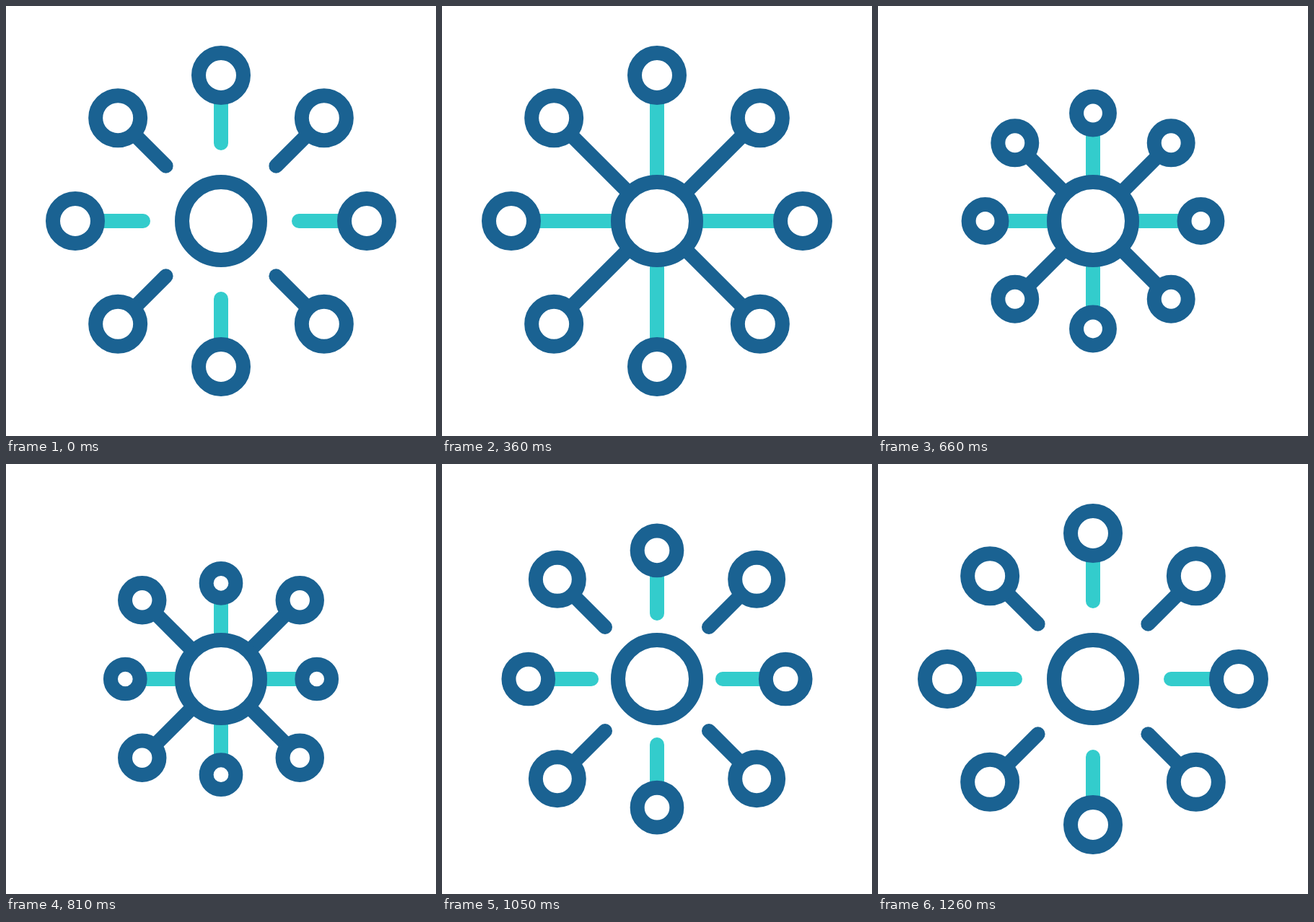
Animation of 596 by 596 pixels, one loop 1500 ms. Source, as an HTML page with a canvas:

```html
<!DOCTYPE html>
<html lang="en">
<head>
<meta charset="utf-8">
<title>Hub and nodes</title>
<style>
  html, body { margin: 0; width: 100%; height: 100%; overflow: hidden; background: #fff; }
  canvas { display: block; width: 596px; height: 596px; }
</style>
</head>
<body>
<canvas id="stage" width="596" height="596"></canvas>
<script>
const ctx = document.getElementById('stage').getContext('2d');
const BLUE = '#1a6292', TEAL = '#33cccc';
const LOOP = 1500, STEP = 30;
const CENTER = 298, HUB = 54, ORBIT = 202, NODE = 31, STROKE = 20;

// Keys are [step, value, slope]. "shrink" is the part of the scale taken away;
// "tip" is the inner end of a spoke before scaling.
const straight = {
  color: TEAL, turn: 0,
  shrink: [[12, 0, 0], [18, .0773, .028], [19, .1073, .032], [25, .365, 0],
           [27, .343, -.022], [32, .2, -.0285], [38, .047, -.021], [42, 0, 0]],
  tip: [[0, 108, 0], [15, 54, 0], [21, 54, 0], [27, 86, 4], [32, 98.7, 1.8], [38, 106, .8], [42, 108, 0]]
};
const diagonal = {
  color: BLUE, turn: Math.PI / 4,
  shrink: [[12, 0, 0], [18, .0773, .028], [19, .1085, .032], [23.5, .275, 0],
           [27, .235, -.025], [32, .1024, -.0245], [38, 0, 0]],
  tip: [[0, 108, 0], [15, 54, 0], [21, 54, 0], [27, 78, 5], [32, 98, 3], [38, 108, 0]]
};

// Cubic Hermite curve through the keys, held flat outside them.
function curve(keys, x) {
  if (x <= keys[0][0]) return keys[0][1];
  const i = keys.findIndex(key => key[0] > x);
  if (i < 0) return keys[keys.length - 1][1];
  const [x0, y0, m0] = keys[i - 1], [x1, y1, m1] = keys[i];
  const d = x1 - x0, u = (x - x0) / d, v = 1 - u;
  return v * v * ((1 + 2 * u) * y0 + u * d * m0) + u * u * ((1 + 2 * v) * y1 - v * d * m1);
}

function ring(x, radius) {
  ctx.beginPath();
  ctx.arc(x, 0, radius, 0, Math.PI * 2);
  ctx.fill();
  ctx.strokeStyle = BLUE;
  ctx.stroke();
}

function drawArms(group, step) {
  const scale = 1 - curve(group.shrink, step);
  const tip = curve(group.tip, step) * scale;
  for (let i = 0; i < 4; i++) {
    ctx.save();
    ctx.rotate(group.turn + i * Math.PI / 2);
    ctx.strokeStyle = group.color;
    ctx.beginPath();
    ctx.moveTo(tip, 0);
    ctx.lineTo((ORBIT - NODE) * scale, 0);
    ctx.stroke();
    ring(ORBIT * scale, NODE * scale);
    ctx.restore();
  }
}

function draw(now) {
  const step = Math.floor((now % LOOP) / STEP);
  ctx.setTransform(1, 0, 0, 1, 0, 0);
  ctx.fillStyle = '#fff';
  ctx.fillRect(0, 0, 596, 596);
  ctx.translate(CENTER, CENTER);
  ctx.lineWidth = STROKE;
  ctx.lineCap = 'round';
  drawArms(straight, step);
  drawArms(diagonal, step);
  ring(0, HUB);
}

let start;
function tick(now) {
  start ??= now;
  draw(Math.max(0, now - start));
  requestAnimationFrame(tick);
}
draw(0);
requestAnimationFrame(tick);
</script>
</body>
</html>
```
